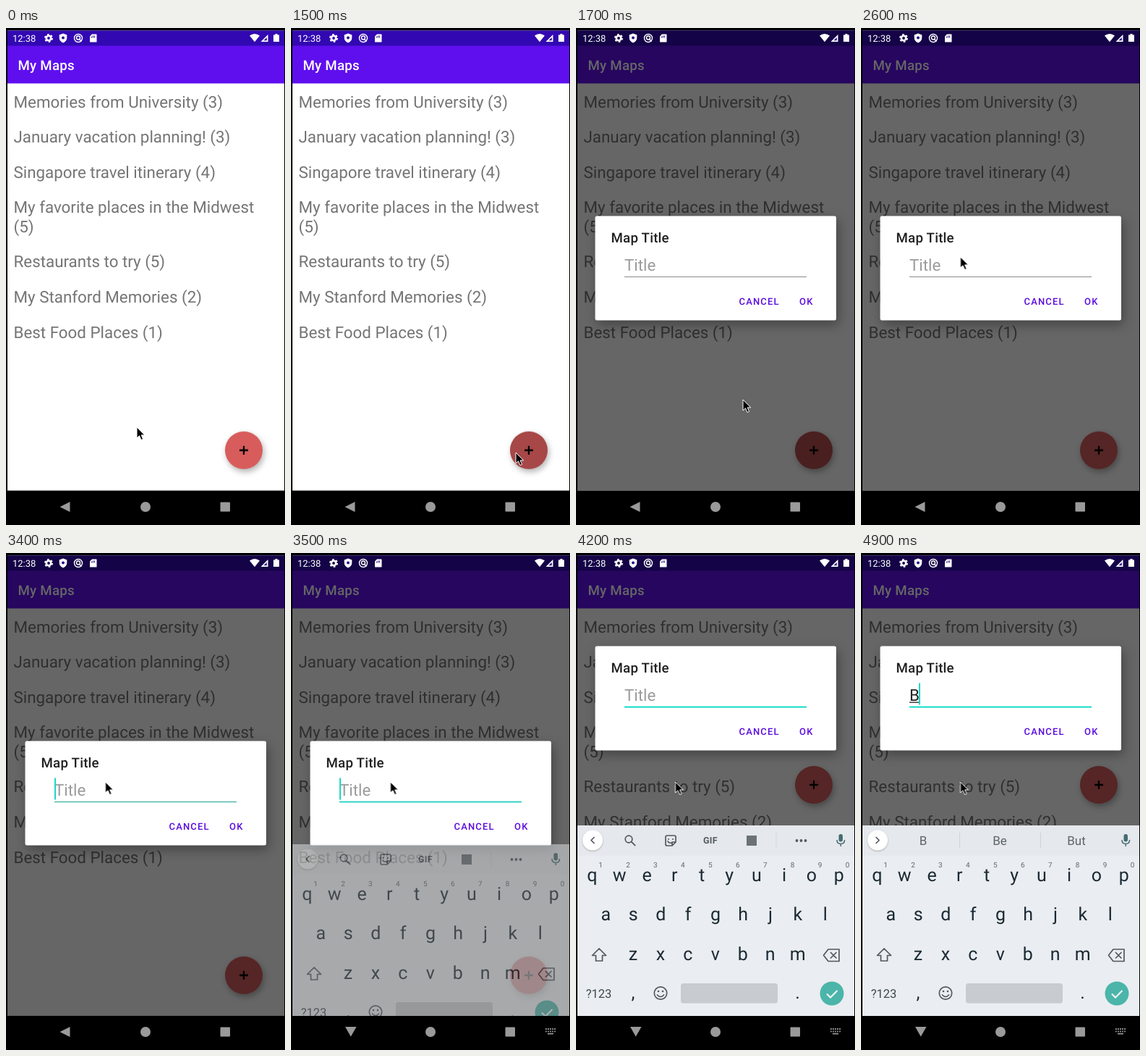
An HTML page that plays this animation: 386 px wide and 686 px high, repeating every 5000 ms.

```html
<!DOCTYPE html>
<html lang="en">
<head>
<meta charset="utf-8">
<title>My Maps</title>
<style>
html, body { margin: 0; width: 100%; height: 100%; overflow: hidden; background: #000; }
svg { display: block; width: 386px; height: 686px; font-family: Roboto, sans-serif; text-rendering: geometricPrecision; }
.list { font-size: 22.36px; fill: #757575; }
.head { font-size: 18.7px; font-weight: 500; letter-spacing: .0125em; }
.btn { font-size: 13px; font-weight: 500; letter-spacing: .089em; fill: #5a0be0; }
.field { font-size: 22.36px; }
.mid { text-anchor: middle; }
.key { font-size: 25px; fill: #1b2a33; }
.num { font-size: 10px; fill: #60686d; }
.word { font-size: 17px; fill: #5c6569; }
.line { fill: none; stroke: #50595e; stroke-width: 1.7; stroke-linejoin: round; stroke-linecap: round; }
.disc { filter: drop-shadow(0 1px 1px rgba(0,0,0,.25)); }
.fabdisc { filter: drop-shadow(2px 4px 4px rgba(0,0,0,.3)); }
.card { filter: drop-shadow(3px 6px 8px rgba(0,0,0,.33)); }

/* One 5 s clock for everything; 2% is one 100 ms step */
.a { animation: 5s step-end -20ms infinite; }
#pointer { animation-name: pointer; }
#fab { animation-name: fab; }
#press { animation-name: press; }
#dim { animation-name: dim; }
#dialog { animation-name: dialog; }
#focus { animation-name: focus; }
#caret { animation-name: caret; }
#hint, #tools { animation-name: hide; }
#typed, #words { animation-name: show; }
#tools, #words { animation-delay: 80ms; animation-fill-mode: backwards; }
#keyboard { animation-name: keyboard; }
.plainnav { animation-name: navout; }
.keynav { animation-name: navin; }

@keyframes pointer {
  0% { transform: translate(181px, 551px); }
  14% { transform: translate(190px, 553px); }
  16% { transform: translate(212px, 560px); }
  18% { transform: translate(246px, 570px); }
  20% { transform: translate(280px, 579px); }
  22% { transform: translate(302px, 584px); }
  24% { transform: translate(311px, 586px); }
  32% { transform: translate(289px, 564px); }
  34% { transform: translate(231px, 513px); }
  36% { transform: translate(180px, 452px); }
  38% { transform: translate(153px, 390px); }
  40% { transform: translate(142px, 345px); }
  42% { transform: translate(138px, 322px); }
  44%, 100% { transform: translate(137.5px, 316px); }
}
@keyframes fab {
  0% { transform: translate(329px, 582.8px); }
  72%, 100% { transform: translate(329px, 320px); }
}
@keyframes press {
  0% { opacity: 0; }
  28% { opacity: .1; }
  30% { opacity: .23; }
  34% { opacity: .16; }
  36% { opacity: .08; }
  38%, 100% { opacity: 0; }
}
@keyframes dim {
  0% { opacity: 0; }
  32% { opacity: .22; }
  34%, 100% { opacity: .6; }
}
@keyframes dialog {
  0% { opacity: 0; transform: translateY(0); }
  32% { opacity: .56; transform: translateY(0); }
  34% { opacity: 1; transform: translateY(0); }
  72% { opacity: 1; transform: translateY(-117px); }
  74%, 100% { opacity: 1; transform: translateY(-131px); }
}
@keyframes focus {
  0% { opacity: 0; }
  68% { opacity: .4; }
  70% { opacity: .8; }
  72%, 100% { opacity: 1; }
}
@keyframes caret {
  0% { opacity: 0; transform: translateX(0); }
  68% { opacity: 1; transform: translateX(0); }
  78% { opacity: 0; transform: translateX(0); }
  88% { opacity: 1; transform: translateX(0); }
  92%, 100% { opacity: 1; transform: translateX(13px); }
}
@keyframes hide { 0% { opacity: 1; } 92%, 100% { opacity: 0; } }
@keyframes show { 0% { opacity: 0; } 92%, 100% { opacity: 1; } }
@keyframes keyboard {
  0% { opacity: 0; transform: translateY(26px); }
  70% { opacity: .5; transform: translateY(26px); }
  72%, 100% { opacity: 1; transform: translateY(0); }
}
@keyframes navout { 0% { opacity: 1; } 70%, 100% { opacity: 0; } }
@keyframes navin { 0% { opacity: 0; } 70%, 100% { opacity: 1; } }
</style>
</head>
<body>
<svg viewBox="0 0 386 686">
  <defs>
    <clipPath id="screen"><rect x="2" y="3.5" width="383" height="635"/></clipPath>
  </defs>

  <g clip-path="url(#screen)">
    <rect x="2" y="3" width="383" height="636" fill="#fff"/>
    <rect x="2" y="3" width="383" height="22" fill="#3208b2"/>
    <rect x="2" y="24.5" width="383" height="52" fill="#5f0fee"/>
    <text class="head" x="16.5" y="58" fill="#fff">My Maps</text>
    <g class="list" id="list"></g>

    <g id="fab" class="a">
      <circle class="fabdisc" r="26" fill="#d85c5c"/>
      <circle id="press" class="a" r="26"/>
      <path d="M-6 0H6M0-6V6" stroke="#000" stroke-width="2.3"/>
    </g>

    <rect id="dim" class="a" x="2" y="3" width="383" height="636"/>

    <g id="dialog" class="a">
      <rect class="card" x="26.5" y="259.5" width="333.5" height="144" rx="2.5" fill="#fff"/>
      <text class="head" x="48.5" y="296" fill="#212121">Map Title</text>
      <g class="field">
        <text id="hint" class="a" x="67" y="334.5" fill="#9b9b9b">Title</text>
        <g id="typed" class="a" fill="#222">
          <text x="67" y="334.5">B</text>
          <rect x="67" y="336.5" width="14" height="1.3"/>
        </g>
      </g>
      <rect x="67" y="343" width="252" height="1" fill="#8a8a8a"/>
      <rect id="focus" class="a" x="67" y="342.6" width="252" height="1.9" fill="#03dac5"/>
      <rect id="caret" class="a" x="67" y="310.5" width="2" height="30" fill="#1fd6c5"/>
      <text class="btn" x="225.5" y="382">CANCEL</text>
      <text class="btn" x="309" y="382">OK</text>
    </g>

    <g id="keyboard" class="a">
      <rect x="2" y="376" width="383" height="263" fill="#eaedf1"/>
      <rect x="2" y="376" width="383" height="41.5" fill="#e5e8ec"/>
      <circle class="disc" cx="23" cy="396.5" r="14" fill="#fff"/>
      <g id="tools" class="a">
        <path class="line" d="M25 392.5l-4 4 4 4"/>
        <circle class="line" cx="73" cy="395" r="4.8"/>
        <path class="line" d="M76.7 398.7l5 5"/>
        <path class="line" d="M126 390h10q2 0 2 2v7l-5 5h-7q-2 0-2-2v-10q0-2 2-2zM133 404v-5h5M127 398q2 3 5 2"/>
        <circle cx="128" cy="395" r="1" fill="#50595e"/>
        <circle cx="134" cy="395" r="1" fill="#50595e"/>
        <text class="mid" x="186" y="401" font-size="12.5" font-weight="700" letter-spacing=".3" fill="#50595e">GIF</text>
        <rect x="236" y="390" width="14" height="14" fill="#6a7276"/>
        <path d="M277 386v21" stroke="#d3d7da"/>
        <g fill="#50595e">
          <circle cx="305.5" cy="397" r="1.9"/>
          <circle cx="311.5" cy="397" r="1.9"/>
          <circle cx="317.5" cy="397" r="1.9"/>
        </g>
      </g>
      <g id="words" class="a">
        <path class="line" d="M21 392.5l4 4-4 4"/>
        <path d="M136.5 386v21M248.5 386v21" stroke="#cfd3d6"/>
        <g class="word mid">
          <text x="86" y="403">B</text>
          <text x="192" y="403">Be</text>
          <text x="298" y="403">But</text>
        </g>
      </g>
      <rect x="363.5" y="388" width="5.5" height="10.5" rx="2.7" fill="#466c72"/>
      <path d="M361 396q0 5.5 5.3 5.5t5.3-5.5M366.3 401.5v3.5" fill="none" stroke="#466c72" stroke-width="1.5"/>

      <g id="keys"></g>

      <path class="line" d="M32 546l-9.5 9.5h5v7.5h9v-7.5h5z"/>
      <path class="line" d="M349 547h15v16.5h-15l-6.5-8.25zM352.5 551.5l7.5 7.5M360 551.5l-7.5 7.5"/>
      <text class="mid" x="31.5" y="613.5" font-size="16.5" fill="#3c474d">?123</text>
      <circle class="line" cx="117" cy="607.5" r="8.7"/>
      <path class="line" d="M112.5 610q4.5 5 9 0"/>
      <circle cx="114" cy="605" r="1.3" fill="#50595e"/>
      <circle cx="120" cy="605" r="1.3" fill="#50595e"/>
      <rect x="145" y="594" width="134" height="27.5" rx="3.5" fill="#c8cbcf"/>
      <circle cx="354" cy="608" r="16.5" fill="#4bb5aa"/>
      <path d="M347 608.5l5 5 9.5-9.5" fill="none" stroke="#fff" stroke-width="2"/>
    </g>
  </g>

  <g fill="#fff">
    <text x="9" y="18.5" font-size="13">12:38</text>
    <circle cx="59" cy="14" r="3.2" fill="none" stroke="#fff" stroke-width="2.6"/>
    <circle cx="59" cy="14" r="5.1" fill="none" stroke="#fff" stroke-width="1.8" stroke-dasharray="2.67"/>
    <path d="M79 7.5l5.3 2v4q0 4.5-5.3 7-5.3-2.5-5.3-7v-4z"/>
    <circle cx="79" cy="13.5" r="2" fill="#27108a"/>
    <g fill="none" stroke="#fff" stroke-width="1.4">
      <circle cx="100" cy="14" r="5.5"/>
      <circle cx="100" cy="13.5" r="2.5"/>
      <path d="M101.5 15.5l3 3"/>
    </g>
    <path d="M119 8.5h6q.5 0 .5.5v10q0 .5-.5.5h-8.5q-.5 0-.5-.5v-7.5z"/>
    <path d="M118.5 11.5v2M120.5 10.5v3M122.5 10.5v3" stroke="#27108a"/>
    <path d="M337 10.5q7-5 14 0l-7 8.7z"/>
    <path d="M362.5 9v10h-10z"/>
    <path d="M360.8 13v4.3h-4.3z" fill="#27108a"/>
    <path d="M370 9.5h2.5v-1.5h3v1.5h2.5v9.5h-8z"/>
  </g>

  <g fill="#9a9a9a">
    <path class="a plainnav" d="M88.5 654v14l-14-7z"/>
    <path class="a keynav" d="M75 654h15.5l-7.75 13.5z"/>
    <circle cx="193" cy="661" r="7"/>
    <rect x="296.5" y="654.5" width="13.5" height="13" rx="1"/>
    <g class="a keynav">
      <path d="M352 657h14M352 660.3h14" stroke="#9a9a9a" stroke-width="1.8" stroke-dasharray="1.8 1.25"/>
      <rect x="355" y="662.7" width="8" height="1.7"/>
    </g>
  </g>

  <path id="pointer" class="a" d="M0 0V15L3.5 11.8 6 17.5 8.6 16.4 6.2 10.9H10.8Z" fill="#000" stroke="#fff" stroke-width="1"/>
</svg>
<script>
const addText = (parent, text, x, y, cls = '') => {
  const el = document.createElementNS('http://www.w3.org/2000/svg', 'text');
  el.setAttribute('x', x);
  el.setAttribute('y', y);
  el.setAttribute('class', cls);
  el.textContent = text;
  parent.append(el);
};

const list = document.getElementById('list');
const maps = [
  ['Memories from University (3)'],
  ['January vacation planning! (3)'],
  ['Singapore travel itinerary (4)'],
  ['My favorite places in the Midwest', '(5)'],
  ['Restaurants to try (5)'],
  ['My Stanford Memories (2)'],
  ['Best Food Places (1)']
];
const rowHeight = 48.57, lineHeight = 26.35;
let y = 109.75;
for (const lines of maps) {
  lines.forEach((line, i) => addText(list, line, 10.5, Math.round(y + i * lineHeight)));
  y += rowHeight + (lines.length - 1) * lineHeight;
}

const keys = document.getElementById('keys');
const pitch = 37.95;
const addRow = (letters, x, y) =>
  [...letters].forEach((c, i) => addText(keys, c, x + i * pitch, y, 'key mid'));
addRow('qwertyuiop', 22.3, 452.5);
addRow('asdfghjkl', 41.3, 507);
addRow('zxcvbnm', 79, 561.5);
addRow(',', 79, 615);
addRow('.', 306.5, 615);
[...'1234567890'].forEach((c, i) => addText(keys, c, 34 + i * pitch, 434, 'num mid'));
</script>
</body>
</html>
```
